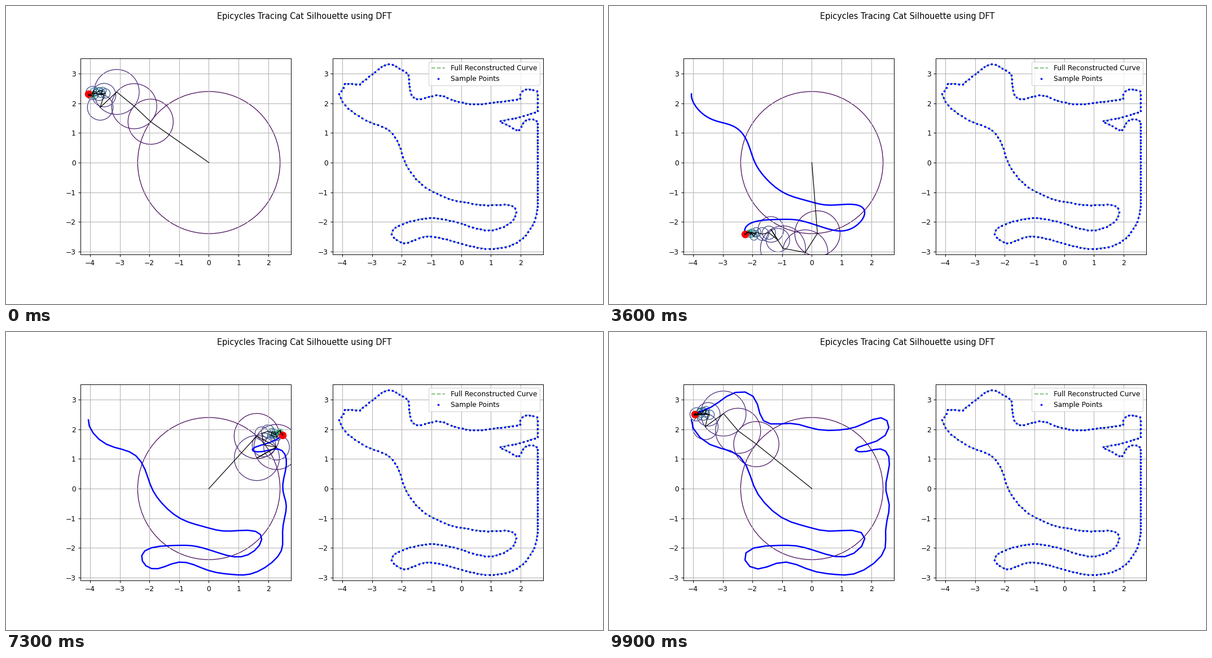
Animation, 1058 px wide and 529 px high, one loop 10 s. Source, as a matplotlib script:

```python
import numpy as np
import matplotlib.pyplot as plt
from matplotlib.animation import FuncAnimation

FRAMES = 100
SAMPLES = 250
TERMS = 30

# Key points of the smooth strokes; each stroke starts where the last one ended.
START = (-4.11, 2.31)
CHEST = [[(-3.95, 1.98), (-3.28, 1.46), (-2.5, 1.13), (-2.2, 0.82),
          (-1.8, -0.18), (-1.25, -0.8), (-0.36, -1.25)]]
TAIL = [[(0.75, -1.43), (1.65, -1.44), (1.83, -1.58), (1.74, -1.94),
         (1.0, -2.28), (-0.4, -1.95), (-1.15, -1.87), (-2.23, -2.2),
         (-2.34, -2.42), (-1.95, -2.71), (-1.15, -2.48), (0.3, -2.81),
         (1.0, -2.905), (1.9, -2.68), (2.45, -2.0), (2.56, -1.5)]]
BACK = [[(2.56, 1.38)]]
PAWS_AND_HEAD = [
    [(2.4, 1.46), (2.18, 1.44), (1.92, 1.06)],
    [(1.29, 1.4)],
    [(1.95, 1.53), (2.56, 1.72)],
    [(2.56, 2.4)],
    [(2.2, 2.48), (2.0, 2.35), (1.98, 2.15)],
    [(0.9, 2.0), (0.5, 1.965), (-0.13, 2.06), (-0.78, 2.27), (-1.45, 2.14),
     (-1.66, 2.24), (-1.79, 3.0)],
    [(-2.45, 3.315), (-3.0, 2.98), (-3.42, 2.64)],
    [(-3.92, 2.67)],
    [(-4.0, 2.46)],
    [START],
]

# Parts of the outline and the phase of the loop at which each one is complete.
PARTS = [(0.15, CHEST), (0.535, TAIL), (0.643, BACK), (1, PAWS_AND_HEAD)]


def spline(points):
    """Centripetal Catmull-Rom curve through complex points."""
    p = np.array(points)
    gap = np.sqrt(np.abs(np.diff(p)))
    slope = np.diff(p) / gap
    inner = (slope[:-1] * gap[1:] + slope[1:] * gap[:-1]) / (gap[:-1] + gap[1:])
    tangent = np.concatenate([slope[:1], inner, slope[-1:]])
    u = np.linspace(0, 1, 30)
    return np.concatenate([
        (1 + 2 * u) * (1 - u)**2 * a + u**2 * (3 - 2 * u) * b
        + g * u * (1 - u) * ((1 - u) * ta - u * tb)
        for a, b, g, ta, tb in zip(p, p[1:], gap, tangent, tangent[1:])])


def sample_outline():
    """Points at equal time steps; the pace is constant within each part."""
    pen, phase = complex(*START), 0
    times, curve = [], []
    for end, strokes in PARTS:
        pieces = []
        for stroke in strokes:
            pieces.append(spline([pen] + [complex(*p) for p in stroke]))
            pen = pieces[-1][-1]
        part = np.concatenate(pieces)
        length = np.append(0, np.cumsum(np.abs(np.diff(part))))
        times.append(phase + (end - phase) * length / length[-1])
        curve.append(part)
        phase = end
    t = np.arange(SAMPLES) / SAMPLES
    return np.interp(t, np.concatenate(times), np.concatenate(curve))


outline = sample_outline()
coefs = np.fft.fft(outline) / SAMPLES
freqs = np.fft.fftfreq(SAMPLES, 1 / SAMPLES)
coefs[0] = 0
order = np.argsort(-np.abs(coefs))[:TERMS]
coefs, freqs = coefs[order], freqs[order]


def arms(t):
    return coefs * np.exp(2j * np.pi * np.multiply.outer(t, freqs))


fig, (left, right) = plt.subplots(1, 2, figsize=(12, 6), dpi=1058 / 12)
fig.suptitle("Epicycles Tracing Cat Silhouette using DFT", fontsize=11.87)
for ax in (left, right):
    ax.set_aspect("equal")
    ax.set_xlim(-4.315, 2.762)
    ax.set_ylim(-3.105, 3.515)
    ax.grid(True)

right.plot(outline.real, outline.imag, "g--", alpha=0.5,
           label="Full Reconstructed Curve")
right.plot(outline.real, outline.imag, "b.", markersize=4, label="Sample Points")
right.legend(loc="upper right")

circles = [left.add_patch(plt.Circle((0, 0), abs(c), fill=False, color=color))
           for c, color in zip(coefs, plt.cm.viridis(np.linspace(0, 1, TERMS)))]
trail, = left.plot([], [], "b-", lw=2)
tip, = left.plot([], [], "ro", markersize=10)
chain, = left.plot([], [], "k-", lw=1)


def update(frame):
    t = frame / FRAMES
    joints = np.append(0, np.cumsum(arms(t)))
    for circle, joint in zip(circles, joints):
        circle.center = joint.real, joint.imag
    path = arms(np.linspace(0, t, 100)).sum(axis=1)
    trail.set_data(path.real, path.imag)
    tip.set_data(joints[-1:].real, joints[-1:].imag)
    chain.set_data(joints.real, joints.imag)
    return [*circles, trail, tip, chain]


anim = FuncAnimation(fig, update, frames=FRAMES, interval=100, repeat=True)
plt.show()
```
